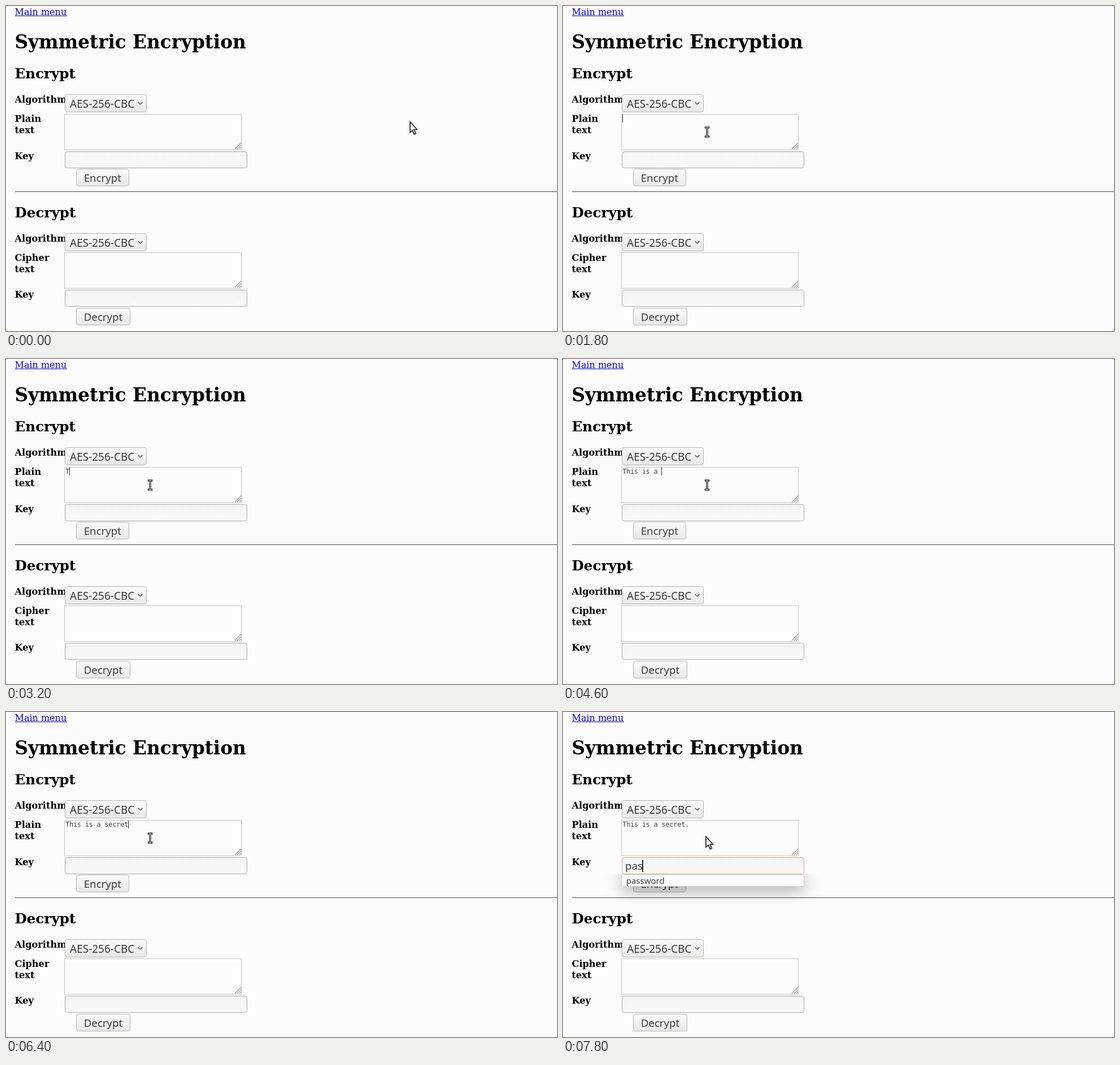
Animation of 975 by 575 pixels, one loop 8000 ms. Source, as an HTML page with a canvas:

```html
<!DOCTYPE html>
<html lang="en">
<head>
<meta charset="utf-8">
<title>Symmetric Encryption</title>
<style>
html, body { margin: 0; width: 100%; height: 100%; overflow: hidden; background: #fcfcfc; }
canvas { display: block; width: 975px; height: 575px; }
</style>
</head>
<body>
<canvas id="stage" width="975" height="575"></canvas>
<script>
const ctx = document.getElementById('stage').getContext('2d');
const LOOP = 8000, STEP = 200;
const SERIF = '"DejaVu Serif", serif';
const SANS = '"Noto Sans", "Open Sans", sans-serif';
const MONO = '"DejaVu Sans Mono", monospace';
const PAGE = '#fcfcfc', INK = '#3c3c3c', BORDER = '#b5b2ae';
const MESSAGE = 'This is a secret.', KEY = 'pas';

// Key poses of the pointer: time, x, y
const PATH = [[0, 715, 205], [200, 704, 206], [1000, 356, 224], [1600, 255, 223]];
// Typing progress: time, letters
const TYPING = [[3000, 0], [3200, 1], [4600, 10], [5000, 10], [6200, 16], [6600, 16], [6800, 17]];
const FOCUS_KEY = 7200, POPUP = 7600;

function text(str, x, y, font, color = '#000') {
  ctx.font = font;
  ctx.fillStyle = color;
  ctx.fillText(str, x, y);
}

function box(x, y, w, h, r, fill, border) {
  ctx.beginPath();
  ctx.roundRect(x + 0.5, y + 0.5, w - 1, h - 1, r);
  ctx.fillStyle = fill;
  ctx.fill();
  ctx.strokeStyle = border;
  ctx.lineWidth = 1;
  ctx.stroke();
}

function shade(y, h, top, bottom) {
  const g = ctx.createLinearGradient(0, y, 0, y + h);
  g.addColorStop(0, top);
  g.addColorStop(1, bottom);
  return g;
}

function lines(points, color, width) {
  ctx.beginPath();
  for (const [x1, y1, x2, y2] of points) {
    ctx.moveTo(x1, y1);
    ctx.lineTo(x2, y2);
  }
  ctx.strokeStyle = color;
  ctx.lineWidth = width;
  ctx.stroke();
}

function button(x, y, w, h) {
  box(x, y, w, h, 4, shade(y, h, '#fafafa', '#e8e8e8'), BORDER);
}

function select(y) {
  button(104, y, 145, 32);
  text('AES-256-CBC', 113, y + 24, '19px ' + SANS, INK);
  lines([[233.5, y + 14, 237.5, y + 18], [237.5, y + 18, 241.5, y + 14]], '#555', 1.5);
}

function textarea(y) {
  box(103, y, 314, 64, 0, PAGE, '#c4c3b8');
  const b = y + 62;
  lines([[405, b, 416, b - 11], [409, b, 416, b - 7], [413, b, 416, b - 3]], '#999', 1.2);
}

function field(y, focused) {
  box(104, y, 323, 30, 4, shade(y, 30, '#f3f3f3', '#fafafa'), focused ? '#d3a594' : '#aaa8a6');
}

function form(dy, title, label, focused) {
  const bold = 'bold 16.2px ' + SERIF;
  const mid = dy ? dy - 1 : 0;
  text(title, 15.5, 128 + dy, 'bold 24.6px ' + SERIF);
  text('Algorithm', 15.5, 171 + dy, bold);
  text(label, 15.5, 205 + dy, bold);
  text('text', 15.5, 224.5 + dy, bold);
  text('Key', 15.5, 271 + mid, bold);
  select(156 + dy);
  textarea(191 + mid);
  field(257 + mid, focused);
  button(124, 288 + dy, title === 'Encrypt' ? 94 : 96, 31);
  text(title, 137.7, 311 + dy, '18.7px ' + SANS, INK);
}

function popup() {
  ctx.save();
  ctx.beginPath();
  ctx.rect(0, 287, 975, 288);
  ctx.clip();
  ctx.shadowColor = 'rgba(0,0,0,0.36)';
  ctx.shadowBlur = 28;
  ctx.shadowOffsetY = 6;
  ctx.fillStyle = PAGE;
  ctx.fillRect(103, 287, 324, 22);
  ctx.restore();
  box(103, 287, 324, 22, 0, PAGE, '#cfcfcf');
  text('password', 111.7, 304, '15px ' + SANS, INK);
}

function arrow(x, y) {
  const shape = [[0, 0], [0, 18.5], [4.2, 15], [7.4, 22], [10.2, 20.7], [7, 14], [12.3, 13.5]];
  ctx.beginPath();
  for (const [px, py] of shape) ctx.lineTo(x + px, y + py);
  ctx.closePath();
  ctx.fillStyle = '#fff';
  ctx.fill();
  ctx.strokeStyle = '#23232b';
  ctx.lineWidth = 1.7;
  ctx.stroke();
}

function beam(x, y) {
  const parts = [[x - 2.5, y - 8, x + 2.5, y - 8], [x, y - 8, x, y + 8], [x - 2.5, y + 8, x + 2.5, y + 8]];
  ctx.lineCap = 'square';
  lines(parts, '#2e2e2e', 3.6);
  lines(parts, '#c8c8c8', 1.2);
  ctx.lineCap = 'butt';
}

function caret(x, y, w, h) {
  ctx.fillStyle = '#222';
  ctx.fillRect(Math.round(x), y, w, h);
}

// Values between two poses of a list sorted by time
function pose(list, t) {
  const i = list.findIndex(p => p[0] > t);
  if (i < 0) return list[list.length - 1].slice(1);
  if (!i) return list[0].slice(1);
  const a = list[i - 1], b = list[i];
  const u = (t - a[0]) / (b[0] - a[0]);
  return a.slice(1).map((v, k) => v + (b[k + 1] - v) * u);
}

function blink(t, start) {
  return t >= start && (t - start) % 1200 < 600;
}

function pointer(t) {
  if (t >= POPUP) return arrow(253, 220.5);
  const [x, y] = pose(PATH, t);
  const inside = x > 103 && x < 417;
  (inside ? beam : arrow)(x, y);
}

function draw(t) {
  ctx.fillStyle = PAGE;
  ctx.fillRect(0, 0, 975, 575);
  text('Main menu', 15.5, 16, '16px ' + SERIF, '#0a00c4');
  ctx.fillRect(16, 17, 92, 1);
  text('Symmetric Encryption', 15.5, 75, 'bold 32.7px ' + SERIF);

  const keyFocused = t >= FOCUS_KEY;
  form(0, 'Encrypt', 'Plain', keyFocused);
  form(246, 'Decrypt', 'Cipher', false);
  ctx.fillStyle = '#44444e';
  ctx.fillRect(16, 328, 959, 1);

  const count = Math.floor(pose(TYPING, t)[0] + 1e-6);
  const typed = MESSAGE.slice(0, count);
  text(typed, 105.3, 203, '11.5px ' + MONO, INK);
  const typing = count > 0 && count < MESSAGE.length;
  if (!keyFocused && (typing || blink(t, 1800))) {
    caret(105 + ctx.measureText(typed).width, 192, 1, 14);
  }

  if (keyFocused) {
    const key = KEY.slice(0, (t - FOCUS_KEY) / STEP);
    text(key, 110, 279, '18.7px ' + SANS, INK);
    caret(109.5 + ctx.measureText(key).width, 262, 2, 21);
  }
  if (t >= POPUP) popup();
  pointer(t);
}

function tick(now) {
  draw(Math.floor(now % LOOP / STEP) * STEP);
  requestAnimationFrame(tick);
}
draw(0);
requestAnimationFrame(tick);
</script>
</body>
</html>
```
